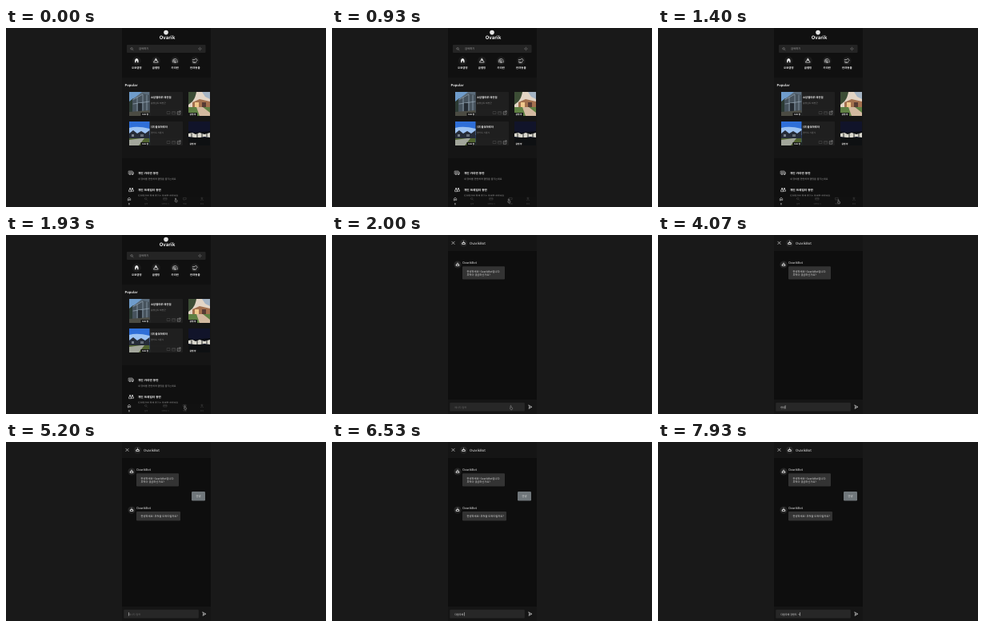
Animation, 400 px wide and 224 px high, one loop 8 s. Source, as an HTML page:

```html
<!DOCTYPE html>
<html lang="ko">
<head>
<meta charset="utf-8">
<title>Camping chat</title>
<style>
html, body { margin: 0; width: 100%; height: 100%; overflow: hidden; background: #191919; }
svg { display: block; width: 100vw; height: 100vh; }
text { font-family: "Noto Sans CJK KR", "Noto Sans CJK", "Noto Sans", sans-serif; text-rendering: geometricPrecision; white-space: pre; }
.line { fill: none; stroke-linecap: round; stroke-linejoin: round; }
</style>
</head>
<body>
<svg id="stage" viewBox="0 0 400 224" xmlns="http://www.w3.org/2000/svg"></svg>
<script>
const LOOP = 8000;
const OPEN_CHAT = 2000;
const BRAND = 'Ovarik';
const BOT = BRAND + 'Bot';

const rect = (x, y, w, h, fill, rx = 0) =>
  `<rect x="${x}" y="${y}" width="${w}" height="${h}" rx="${rx}" fill="${fill}"/>`;
const circle = (x, y, r, fill) => `<circle cx="${x}" cy="${y}" r="${r}" fill="${fill}"/>`;
const shape = (d, fill) => `<path d="${d}" fill="${fill}"/>`;
const line = (d, color = '#ddd', w = 0.6) =>
  `<path class="line" d="${d}" stroke="${color}" stroke-width="${w}"/>`;
const text = (x, y, size, fill, str, weight = 400, extra = '') =>
  `<text x="${x}" y="${y}" font-size="${size}" fill="${fill}" font-weight="${weight}" ${extra}>${str}</text>`;
const mid = 'text-anchor="middle"';
const at = (x, y, body) => `<g transform="translate(${x} ${y})">${body}</g>`;

// Photos, about 26 by 30 each
const photos = {
  lodge: rect(0, 0, 25.5, 30, '#5c6d7c') + shape('M0 0H16L5 9 0 16Z', '#6f9ccb') +
    shape('M0 12 5 8V30H0Z', '#2b3a33') + shape('M4 9 17 2 25.5 4V25H4Z', '#46525c') +
    line('M5 9.5 17 3V25M10 7V25M22 4V25M5 15 25 12', '#9aabb8', 0.7) +
    rect(11, 14, 5, 10, '#252c33') + shape('M0 25 25.5 23V30H0Z', '#4b4b43'),
  village: rect(0, 0, 25.5, 30, '#2f6fd8') + shape('M0 8Q10 5 25.5 9V17H0Z', '#9dc3f2') +
    shape('M0 15 5 11 10 15 15 12 20 15 25.5 11V22H0Z', '#262c38') +
    rect(3, 16, 3, 3, '#79818d') + rect(14, 16, 4, 3, '#656d78') +
    rect(0, 21, 25.5, 9, '#50632f') + shape('M0 23 15 21H19L12 30H0Z', '#a3a79c'),
  garden: rect(0, 0, 27, 30, '#e3d5c5') + shape('M0 0H10Q9 7 5 12L0 16Z', '#3c4d35') +
    shape('M17 0H27V9L21 6Z', '#a4b4c4') +
    shape('M5 13 14 9 27 12V20H5Z', '#a2704e') + rect(8, 13, 5, 6, '#f0c78b') +
    rect(17, 13, 5, 6, '#573c34') + rect(0, 19, 27, 11, '#5f8043') +
    shape('M10 19H18L27 26V30H14Z', '#d3b9a0'),
  night: rect(0, 0, 27, 30, '#11142a') + shape('M0 12 6 14 27 12V16H0Z', '#0a0c12') +
    shape('M0 15 5 14 9 16 14 14 20 16 27 14V20L20 19 12 20.5 0 19Z', '#d9d7cd') +
    line('M4 15V20M11 15V20M17 15V20M23 15V19', '#292a29', 1) +
    rect(0, 20, 27, 10, '#0e1012')
};

const tag = (x, y, label) => rect(x, y, 11, 4, '#111') + text(x + 5.5, y + 3, 2.7, '#eee', label, 700, mid);

function card(y, photo, name, place, side, label) {
  return rect(154, y, 67, 30, '#1f1f1f', 1) + at(154, y, photos[photo]) + tag(168.5, y + 26, '오토 캠') +
    text(181, y + 8, 3.35, '#f0f0f0', name, 700) + text(181, y + 14.5, 2.8, '#888', place) +
    line(`M180 ${y + 22}H220`, '#282828', 0.4) +
    line(`M201.5 ${y + 24.5}h3.5v3h-3.5zM208 ${y + 24.5}h3.5v3.5h-3.5zM208 ${y + 25.7}h3.5`, '#505050', 0.5) +
    line(`M216 ${y + 24.7}h-1.8v3.5h3.6v-1.8M215.8 ${y + 26.3}l2.3-2.3h-1.5m1.5 0v1.5`, '#aaa', 0.5) +
    at(228, y, photos[side]) + tag(228, y + 26, label);
}

const van = line('M-3-2.3H1.6V1.4H-3ZM1.6-.7H3V1.4H1.6M-2-1.2H.4V0H-2Z', '#ddd', 0.5) +
  circle(-1.5, 1.9, 0.7, '#ddd') + circle(1.6, 1.9, 0.7, '#ddd');
const people = circle(-1.4, -1.4, 1, '#ddd') + circle(1.5, -1.4, 1, '#ddd') +
  line('M-3 2V.4H0V2ZM0 .4H3V2H0', '#ddd', 0.6);

const offer = (y, icon, title, note) => at(156.5, y - 0.2, icon) +
  text(165, y + 1.6, 3.65, '#f2f2f2', title, 700) + text(165, y + 8, 3, '#a0a0a0', note);

function home() {
  const cats = [[163.3, '오토캠핑'], [187.5, '글램핑'], [211.3, '카라반'], [236.3, '반려동물']];
  const catIcons = [
    shape('M-2.2 2.3V-.8Q-1.8-2.8 0-3 1.8-2.8 2.2-.8V2.3H.8V.3H-.8V2.3Z', '#eee'),
    line('M0-2.8 2.7 2H-2.7Z', '#eee', 0.7) + shape('M0-2.5 1.2 0H-1.2Z', '#eee'),
    line('M-3 1.5V-.5Q-2.5-2.5 0-2.5H1Q3-2 3 1.5ZM-1.6-1H.6V.4H-1.6Z') + circle(0, 2, 0.8, '#eee'),
    line('M-3-1.5H0L1-3 3-.5 1 1V2.5H-2.5V0M-1 2.5V1')
  ];
  const tabs = [[154, '홈'], [175, '검색'], [199, '예약하기'], [223.5, '챗봇'], [245, '마이']];
  const tabIcons = ['M-1.7 1.7V-.2L0-1.7 1.7-.2V1.7H.6V.5H-.6V1.7Z',
    'M-1.5-.3a1.2 1.2 0 1 0 2.4 0a1.2 1.2 0 1 0-2.4 0M.7.7 1.7 1.7',
    'M-2-1.2H2V1.2H-2ZM-2-.3H2', 'M-1.7-1.4H1.7V.8H0L-1 1.7V.8H-1.7Z',
    'M-.9-.9a.9.9 0 1 0 1.8 0a.9.9 0 1 0-1.8 0M-1.7 1.7Q0-.4 1.7 1.7'];
  return rect(145, 0, 111, 224, '#101010') + rect(145, 62, 111, 101, '#151515') +
    circle(200, 5.6, 2.8, '#e4e4e4') +
    text(201.5, 14.3, 6, '#eee', BRAND, 700, mid) +
    rect(151, 21, 98.5, 10, '#242424', 1) +
    line('M155.8 25.8a1.3 1.3 0 1 0 2.6 0a1.3 1.3 0 1 0-2.6 0M158 26.7l1.1 1.1', '#888', 0.5) +
    text(166, 27.3, 3.35, '#aaa', '검색하기') +
    line('M241.2 26a1.2 1.2 0 1 0 2.4 0a1.2 1.2 0 1 0-2.4 0M242.4 24v.8M242.4 27.2v.8M240.4 26h.8M243.6 26h.8', '#777', 0.4) +
    cats.map(([x, label], i) => circle(x, 41, 5.4, '#1c1c1c') + at(x, 41, catIcons[i]) +
      text(x, 50.9, 3.4, '#e8e8e8', label, 700, mid)).join('') +
    text(148.5, 72.9, 4.1, '#f0f0f0', 'Popular', 700) +
    card(80, 'lodge', '소담별마루 태안점', '충청남도 태안군', 'garden', '글램 핑') +
    card(117, 'village', '(주)들꽃마루터', '경기도 시흥시', 'night', '글램 핑') +
    offer(181.5, van, '개인 카라반 동반', '내 장비를 편안하게 캠핑을 즐기는데요') +
    offer(202.5, people, '개인 트레일러 동반', '트레일러와 함께 즐기는 특별한 하루예요') +
    rect(145, 210.5, 111, 13.5, '#111') +
    tabs.map(([x, label], i) => {
      const color = i ? '#454545' : '#eee';
      return at(x, 213.8, line(tabIcons[i], color, 0.5)) + text(x, 220.5, 2.5, color, label, 500, mid);
    }).join('');
}

const avatar = (x, y) => circle(x, y, 4.6, '#252525') + at(x, y,
  line('M0-2.5V-1.2', '#eee', 0.5) + shape('M-2.2 1.8V.6Q-2-1.3 0-1.3 2-1.3 2.2.6V1.8Z', '#e6e6e6') +
  rect(-1.3, 0.1, 2.6, 1, '#222', 0.4));

const sender = y => avatar(157, y) + text(163, y - 0.6, 3.85, '#eee', BOT, 500);
const bubble = (x, y, w, h, fill = '#333') => rect(x, y, w, h, fill, 1.2);

function chat() {
  return rect(145, 0, 111, 224, '#0e0e0e') + rect(145, 0, 111, 20, '#151515') + rect(145, 206, 111, 18, '#151515') +
    line('M149.8 8.2 153.2 11.6M153.2 8.2 149.8 11.6', '#eee', 0.6) +
    avatar(164.5, 10) + text(172, 11.6, 4.3, '#f0f0f0', BOT, 500) +
    sender(37) + bubble(163, 39.2, 53, 16.3) +
    text(168.5, 46.8, 3.25, '#e6e6e6', `안녕하세요! ${BOT}입니다.`) +
    text(168.5, 51.4, 3.25, '#e6e6e6', '무엇이 궁금하신가요?') +
    `<g id="sent">${bubble(232, 62, 17, 11.5, '#70777b')}${text(240.5, 69, 3.3, '#e8e8e8', '안녕', 400, mid)}${sender(85)}</g>` +
    `<g id="wait">${bubble(163, 87, 15, 11.5)}${text(168.5, 94, 3.3, '#e6e6e6', '...')}</g>` +
    `<g id="reply">${bubble(163, 87, 55, 11.5)}${text(168.5, 94, 3.25, '#e6e6e6', '안녕하세요! 무엇을 도와드릴까요?')}</g>` +
    rect(147.3, 209.8, 93.5, 10.8, '#272727', 1) +
    text(153.2, 216.6, INPUT, '#6c6c6c', '', 400, 'id="field"') +
    `<rect id="caret" y="213.2" width=".5" height="4.4" fill="#eee"/>` +
    line('M246 213 250 215.2 246 217.4 246.7 215.2ZM246.7 215.2H248.3', '#ddd', 0.6);
}

const INPUT = 3.05;
const typed = [
  [2730, ''], [3530, 'ㅇ'], [3670, '아'], [3730, '안'], [3870, '안ㄴ'], [3930, '안녀'], [4000, '안녕'], [4200, ''],
  [5470, 'ㄷ'], [5530, '다'], [5670, '다ㅇ'], [5800, '다으'], [5930, '다음'], [6070, '다음ㅈ'], [6130, '다음주'],
  [6270, '다음주ㅇ'], [6330, '다음주에'], [6530, '다음주에 '], [6670, '다음주에 ㄱ'], [6730, '다음주에 가'],
  [6800, '다음주에 강'], [6930, '다음주에 강ㅇ'], [7070, '다음주에 강워'], [7130, '다음주에 강원'],
  [7330, '다음주에 강원ㄷ'], [7470, '다음주에 강원도'], [7730, '다음주에 강원도 '], [7930, '다음주에 강원도 ㄱ']
];
const path = [
  [0, 211.5, 213], [400, 212, 213.5], [530, 219.5, 214], [870, 220, 214],
  [1300, 225, 215], [1730, 225, 215], [1930, 223, 213.7], [OPEN_CHAT, 223, 213.7], [2530, 209, 214.3]
];

const $ = id => document.getElementById(id);
$('stage').innerHTML = rect(0, 0, 400, 224, '#191919') +
  `<g id="home">${home()}</g><g id="chat">${chat()}</g>` +
  `<path id="cursor" d="M0 0Q.6-.7 1 0V2L2.6 2.6V4L2 5H.6L-.6 3.4-.3 3 0 3.3Z" fill="#222" stroke="#bbb" stroke-width=".4"/>`;

const show = (id, on) => $(id).setAttribute('display', on ? 'inline' : 'none');
const width = s => [...s].reduce((sum, c) => sum + (c === ' ' ? 0.224 : 0.92), 0) * INPUT;

function pointer(t) {
  const i = path.findIndex(p => p[0] > t);
  if (i < 1) return path[path.length - 1].slice(1);
  const [a, b] = [path[i - 1], path[i]];
  const k = (t - a[0]) / (b[0] - a[0]);
  const e = k * k * (3 - 2 * k);
  return [a[1] + (b[1] - a[1]) * e, a[2] + (b[2] - a[2]) * e];
}

function draw(t) {
  const inChat = t >= OPEN_CHAT;
  show('home', !inChat);
  show('chat', inChat);
  show('sent', t >= 4200);
  show('wait', t >= 4200 && t < 4870);
  show('reply', t >= 4870);

  const [since, value] = typed.filter(k => k[0] <= t).pop() || [Infinity, ''];
  $('field').textContent = value || '메시지 입력';
  $('field').setAttribute('fill', value ? '#eee' : '#6c6c6c');
  $('caret').setAttribute('x', 153.2 + width(value));
  show('caret', t >= since && (t - since) % 1000 < 533);

  $('cursor').setAttribute('transform', `translate(${pointer(t).join(' ')})`);
  show('cursor', t < 2870);
}

function tick() {
  draw(performance.now() % LOOP);
  requestAnimationFrame(tick);
}
tick();
</script>
</body>
</html>
```
